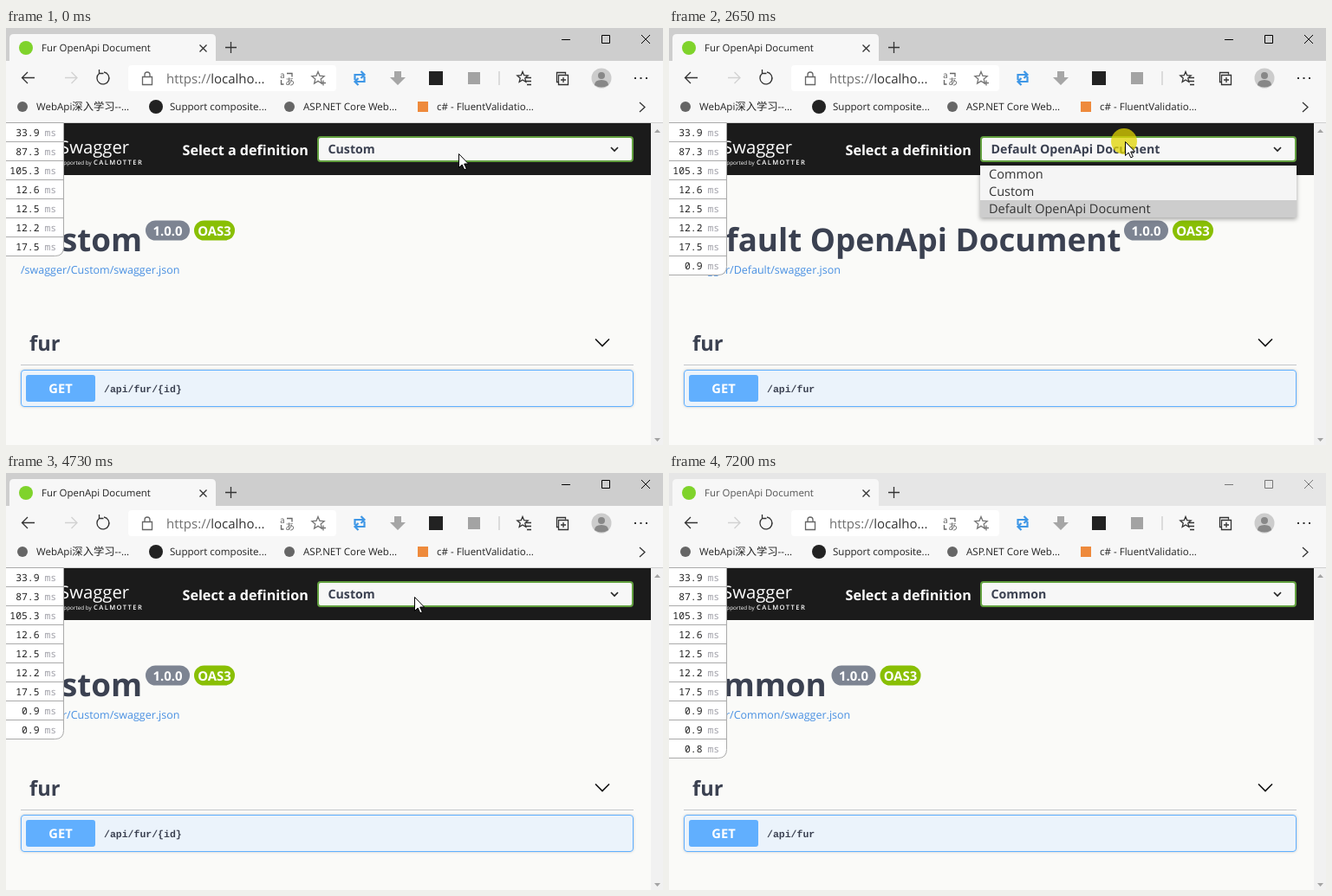
These frames come from a looping animation (758 px wide and 482 px high, 7.29 s). An HTML page:

```html
<!DOCTYPE html>
<html lang="en">
<head>
<meta charset="utf-8">
<title>Fur OpenApi Document</title>
<style>
  html, body { margin: 0; width: 100%; height: 100%; overflow: hidden; }
  svg { display: block; width: 758px; height: 482px; font-family: "Open Sans", "Noto Sans", sans-serif; text-rendering: geometricPrecision; white-space: pre; }
  .line { fill: none; stroke: #333; stroke-width: 1.3; }
  .bold { font-weight: bold; fill: #3b4151; }
  .mono { font-family: "Liberation Mono", "DejaVu Sans Mono", monospace; }
  .timing { font: 11.4px "Noto Sans Mono", "DejaVu Sans Mono", monospace; fill: #222; }
  .bookmark { font-size: 11.55px; fill: #222; }
  .cjk { font-family: "Noto Sans CJK SC", "Noto Sans CJK", sans-serif; }
  .mid { text-anchor: middle; }
  .white { fill: #fff; }
</style>
</head>
<body>
<svg viewBox="0 0 758 482">
  <defs>
    <filter id="shadow" x="-5%" y="-20%" width="110%" height="150%">
      <feDropShadow dx="0" dy="2" stdDeviation="2.5" flood-opacity=".35"/>
    </filter>
    <filter id="glow" x="-2%" y="-20%" width="104%" height="140%">
      <feDropShadow dx="0" dy="0" stdDeviation="1.5" flood-opacity=".2"/>
    </filter>
  </defs>

  <!-- window frame and tab -->
  <rect id="frame" width="758" height="40"/>
  <path d="M4 39V12q0-5 5-5H237q5 0 5 5V39Z" fill="#f7f7f7"/>
  <circle cx="23" cy="23" r="8" fill="#7fd32b"/>
  <text id="tab" x="41" y="27" font-size="11.45">Fur OpenApi Document</text>
  <path class="line" d="M223.5 19.5l8 8m0-8l-8 8M253 22.5h13m-6.5-6.5v13"/>
  <path id="buttons" class="line" style="stroke-width:1" d="M641 13.5h10M687.5 8.5h9v9h-9zM733 8l10 10m0-10l-10 10"/>

  <!-- toolbar -->
  <rect y="38" width="758" height="72" fill="#f7f7f7"/>
  <rect x="141" y="43" width="240" height="30" rx="4" fill="#fff"/>
  <g class="line">
    <path d="M33 57.5H18.5M25 51l-6.5 6.5 6.5 6.5"/>
    <path d="M68 57.5H82M75.5 51l6.5 6.5-6.5 6.5" stroke="#d2d2d2"/>
    <path d="M107.5 52.5A7 7 0 1 0 113 51M107.5 48v4.5h5"/>
    <path d="M157.5 56.5h11v9h-11zM160 56.5v-2.5a3 3 0 0 1 6 0v2.5" stroke="#666"/>
    <polygon data-star="360 58 7.5" stroke="#777"/>
    <path d="M363 63.5h6m-3-3v6" stroke="#777"/>
    <path d="M402.5 60v-6h10M409.5 50l4 4-4 4M413.5 56v6h-10M406.5 58l-4 4 4 4" stroke="#3f97e6" stroke-width="2.2"/>
    <path d="M569 50v16" stroke="#ccc"/>
    <polygon data-star="596 57 6.5"/>
    <path d="M600 57.5h6M599 61.5h7M601 65.5h5"/>
    <path d="M637.5 62.5h-2v-11h10v2M637.5 54.5h11v11h-11zM643 57v6m-3-3h6"/>
    <path d="M731 86l6 5.5-6 5.5"/>
  </g>
  <text x="185" y="64" font-size="15" fill="#333"><tspan fill="#707070">https://</tspan>localho...</text>
  <g fill="#666" class="cjk">
    <text x="316" y="58" font-size="10">a</text>
    <text x="322" y="66" font-size="11">あ</text>
    <path class="line" d="M324 52.5h6v4M317.5 60v5h3" style="stroke:#666"/>
  </g>
  <path d="M448 50h8v7h5l-9 9-9-9h5z" fill="#a6a6a6"/>
  <rect x="488" y="50" width="16" height="16" fill="#222"/>
  <rect x="533" y="51" width="14" height="14" fill="#a3a3a3"/>
  <circle cx="687" cy="58" r="11.5" fill="#ccc"/>
  <circle cx="687" cy="55" r="4" fill="#888"/>
  <path d="M679 66q0-6 8-6t8 6q-8 5-16 0" fill="#888"/>
  <path d="M725 57h2v2h-2zm6.500 0h2v2h-2zm6.500 0h2v2h-2z" fill="#333"/>

  <!-- bookmarks -->
  <circle cx="19" cy="91" r="6" fill="#666"/>
  <circle cx="173" cy="91" r="8" fill="#222"/>
  <circle cx="327" cy="91" r="6" fill="#666"/>
  <rect x="475" y="85" width="12" height="12" fill="#ee8a3c"/>
  <g class="bookmark">
    <text x="35" y="95">WebApi<tspan class="cjk" font-size="12.3">深入学习</tspan>--...</text>
    <text x="189" y="95">Support composite...</text>
    <text x="343" y="95">ASP.NET Core Web...</text>
    <text x="497" y="95">c# - FluentValidatio...</text>
  </g>

  <!-- page -->
  <rect y="109" width="758" height="1" fill="#d0d0d0"/>
  <rect y="110" width="744" height="372" fill="#fafaf8"/>
  <rect x="744" y="110" width="14" height="372" fill="#f1f1f1"/>
  <path d="M748 121h7l-3.5-4zM748 474h7l-3.5 4z" fill="#a3a3a3"/>
  <rect y="110" width="744" height="60" fill="#1b1b1b"/>
  <text class="white" x="62" y="145" font-size="20.3">Swagger</text>
  <text class="white" x="59" y="158" font-size="6.3">Supported by</text>
  <text class="white" x="101" y="158" font-size="7.6" font-weight="600" letter-spacing="1.4">CALMOTTER</text>
  <text class="bold" style="fill:#fff" x="203.5" y="147" font-size="16.15">Select a definition</text>
  <rect x="360" y="126" width="363" height="28" rx="3" fill="#f7f7f7" stroke="#62a03f" stroke-width="2"/>
  <text id="choice" class="bold" x="371.5" y="145" font-size="14.2"/>
  <path class="line" d="M698 138l4 4 4-4" style="stroke:#222;stroke-width:1.7"/>

  <text id="title" class="bold" x="16.5" y="258" font-size="36.75"/>
  <g id="badges">
    <rect y="222.5" width="51" height="23" rx="11.5" fill="#7d8492"/>
    <rect x="56" y="222.5" width="47" height="23" rx="11.5" fill="#89bf04"/>
    <g class="bold mid" style="fill:#fff" font-size="14.9">
      <text x="25.5" y="240">1.0.0</text>
      <text x="79.5" y="240">OAS3</text>
    </g>
  </g>
  <text id="link" x="17" y="284" font-size="12.5" fill="#4990e2"/>
  <text class="bold" x="27" y="373" font-size="23.6">fur</text>
  <path class="line" d="M680 359.5l8 8 8-8" style="stroke:#111;stroke-width:1.6"/>
  <rect x="17" y="389" width="707" height="1" fill="#c3c5c9"/>
  <rect x="17.5" y="395.5" width="706" height="42" rx="3.5" fill="#ebf3fb" stroke="#61affe" filter="url(#glow)"/>
  <rect x="23" y="401" width="80" height="31" rx="3" fill="#61affe"/>
  <text class="bold mid" style="fill:#fff" x="63" y="422" font-size="14.7">GET</text>
  <text id="path" class="bold mono" x="113" y="421" font-size="11.5"/>

  <g id="menu" font-size="14.5" fill="#333">
    <rect x="359" y="159" width="365" height="60" fill="#f5f5f5" filter="url(#shadow)"/>
    <rect id="hover" x="359" width="365" height="20" fill="#cdcdcd"/>
    <text x="369" y="174">Common</text>
    <text x="369" y="194">Custom</text>
    <text x="369" y="214">Default OpenApi Document</text>
  </g>

  <path id="panel" fill="#fff" stroke="#aaa"/>
  <g id="rows"></g>

  <circle id="press" r="15" fill="#e0d400" opacity=".75"/>
  <g id="cursor" fill="#fff" stroke="#000" stroke-linejoin="round">
    <path id="arrow" d="M.5 .5V16.5L4.2 13 6.8 18.8 9.3 17.7 6.7 12H11.5Z"/>
    <path id="hand" d="M-2 14V2a1.7 1.7 0 0 1 3.4 0V8q3.2-1 3.4 1q3-.9 3.2 1q3-.5 3 1.600V16q0 3-2 5v2.500H0V21L-6 14.500q-1-2 .8-2.200q1.500 0 3.200 1.700Z"/>
  </g>
</svg>
<script>
const LOOP = 7290;
const $ = id => document.getElementById(id);
const show = (id, on) => $(id).style.display = on ? '' : 'none';
const within = (t, spans) => spans.some(([a, b]) => t >= a && t < b);

// menu order; badge = left edge of the version badge
const docs = [
  { name: 'Common', key: 'Common', path: '/api/fur', badge: 187.5 },
  { name: 'Custom', key: 'Custom', path: '/api/fur/{id}', badge: 161 },
  { name: 'Default OpenApi Document', key: 'Default', path: '/api/fur', badge: 525 }
];
const timings = ['33.9', '87.3', '105.3', '12.6', '12.5', '12.2', '17.5', '0.9', '0.9', '0.8'];

// [start, selected document, number of timing rows]
const loads = [[0, 1, 7], [930, 2, 8], [3490, 1, 9], [5640, 0, 10]];
const opens = [[70, 930], [2650, 3490], [4810, 5640]];
const presses = [[70, 150], [850, 930], [2650, 2730], [3410, 3490], [4810, 4890], [5420, 5640]];

// pointer: [time, x, y]
const moves = [
  [0, 522, 145], [150, 522, 145], [680, 474, 205], [930, 474, 205],
  [1230, 136, 430], [1300, 136, 430], [1550, 159, 427], [1619, 159, 427],
  [1620, 177, 427], [2010, 177, 427], [2350, 553, 107], [2490, 526, 131],
  [2730, 526, 131], [3000, 505, 212], [3260, 440, 190], [3490, 440, 190],
  [3580, 360, 263], [3650, 360, 263], [3870, 142, 424], [4039, 142, 424],
  [4040, 139, 424], [4180, 139, 424], [4510, 440, 150], [4640, 440, 150],
  [4730, 471, 143], [4890, 471, 143], [5340, 421, 168], [5640, 421, 168],
  [6120, 302, 464], [6340, 302, 464], [6430, 290, 445], [6590, 283, 490],
  [LOOP, 283, 490]
];

function pointer(t) {
  const i = moves.findIndex(m => m[0] > t);
  const [t0, x0, y0] = moves[i - 1], [t1, x1, y1] = moves[i];
  const p = (t - t0) / (t1 - t0), e = p * p * (3 - 2 * p);
  return [Math.round(x0 + (x1 - x0) * e), Math.round(y0 + (y1 - y0) * e)];
}

for (const star of document.querySelectorAll('[data-star]')) {
  const [cx, cy, r] = star.dataset.star.split(' ').map(Number);
  star.setAttribute('points', Array.from({ length: 10 }, (_, i) => {
    const d = i % 2 ? r * .45 : r, a = i * Math.PI / 5;
    return [cx + d * Math.sin(a), cy - d * Math.cos(a)];
  }).join(' '));
}

let shown;
function load(item) {
  if (item === shown) return;
  shown = item;
  const doc = docs[item[1]], count = item[2], bottom = 109.5 + 22 * count;
  $('choice').textContent = $('title').textContent = doc.name;
  $('link').textContent = `/swagger/${doc.key}/swagger.json`;
  $('path').textContent = doc.path;
  $('badges').setAttribute('transform', `translate(${doc.badge})`);
  $('panel').setAttribute('d', `M-1 109.5H66.5V${bottom - 10}q0 10-10 10H-1Z`);
  $('rows').innerHTML = timings.slice(0, count).map((ms, i) => {
    const y = 110 + 22 * i;
    return (i ? `<rect y="${y - 1}" width="66" height="1" fill="#aaa"/>` : '') +
      `<text class="timing" x="38.5" y="${y + 15}" text-anchor="end">${ms}</text>` +
      `<text class="timing" x="44.5" y="${y + 15}" style="fill:#a3a3ab">ms</text>`;
  }).join('');
}

function draw(t) {
  const item = loads.filter(l => l[0] <= t).pop();
  load(item);

  const [x, y] = pointer(t);
  const row = Math.floor((y - 159) / 20);
  show('menu', within(t, opens));
  $('hover').setAttribute('y', 159 + 20 * (docs[row] ? row : item[1]));

  const onLink = y > 340 && y < 438 && x > 17 && x < 724;
  show('hand', onLink);
  show('arrow', !onLink);
  $('cursor').setAttribute('transform', `translate(${x} ${y})`);
  show('press', within(t, presses));
  $('press').setAttribute('cx', x - 1);
  $('press').setAttribute('cy', y);

  const active = t < 7200;
  $('frame').setAttribute('fill', active ? '#cecece' : '#e6e6e6');
  $('tab').setAttribute('fill', active ? '#222' : '#555');
  $('buttons').style.stroke = active ? '#000' : '#777';
}

const start = performance.now();
function tick() {
  draw((performance.now() - start) % LOOP);
  requestAnimationFrame(tick);
}
tick();
</script>
</body>
</html>
```
